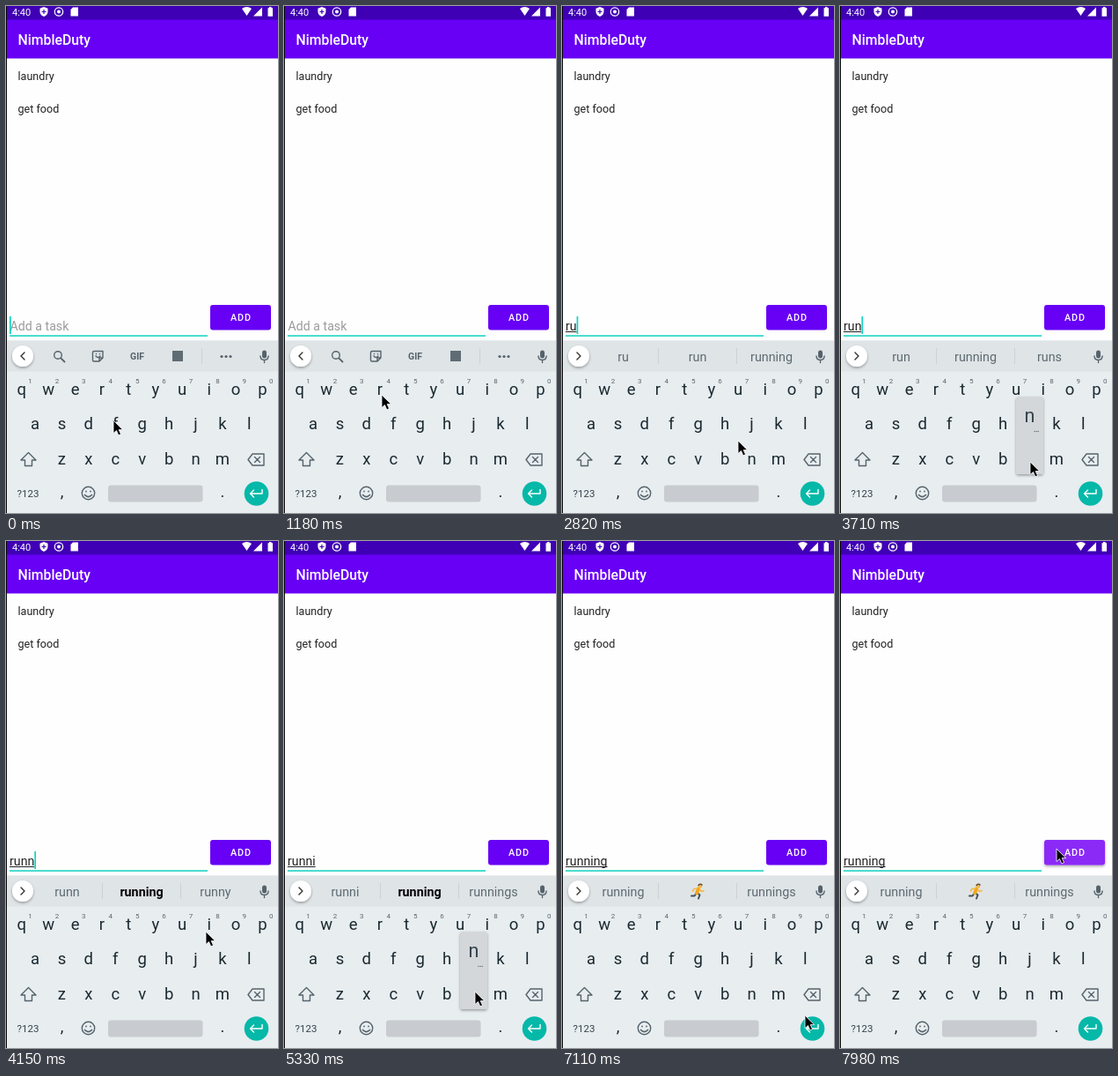
Recreate the animation shown at these times as an HTML page. Size 309 by 575 pixels, loop 8000 ms.

```html
<!DOCTYPE html>
<html lang="en">
<head>
<meta charset="utf-8">
<title>To-do list</title>
<style>
  html, body { margin: 0; width: 100%; height: 100%; overflow: hidden; background: #fefefe; }
  svg { display: block; width: 100%; height: 100%; font-family: Roboto, sans-serif; }
  .mid { text-anchor: middle; }
  .keys { font-size: 18.5px; fill: #1b2a31; }
  .hints { font-size: 8px; fill: #59666d; }
  .words { font-size: 14.3px; fill: #5d6a71; }
  .words .best { font-weight: 700; fill: #000; }
  .line { fill: none; stroke: #55636b; stroke-width: 1.4; stroke-linecap: round; stroke-linejoin: round; }
</style>
</head>
<body>
<svg viewBox="0 0 309 575" preserveAspectRatio="none">
  <defs>
    <filter id="soft" x="-30%" y="-30%" width="160%" height="180%">
      <feDropShadow dx="0" dy="1.5" stdDeviation="1.5" flood-opacity=".35"/>
    </filter>
  </defs>

  <rect width="309" height="575" fill="#fefefe"/>
  <rect y="15" width="309" height="44.5" fill="#6700f5"/>
  <rect width="309" height="15.5" fill="#3f00b5"/>
  <text x="7" y="11" font-size="11" fill="#fff">4:40</text>
  <g fill="#fff">
    <path d="M43 1l4.5 1.8v3.4q0 4-4.5 5.8q-4.5-1.800-4.500-5.800v-3.400z"/>
    <path d="M43 4v5M40.500 6.500h5" stroke="#3f00b5" stroke-width="1.200"/>
    <circle cx="60" cy="6.500" r="4.700" fill="none" stroke="#fff" stroke-width="1.200"/>
    <circle cx="60" cy="6.500" r="2"/>
    <path d="M76 1.500h6v10h-8.500v-7.500z"/>
    <path d="M268 3q5.500-4 11 0l-5.500 8z"/>
    <path d="M291 1.500v10h-10z"/>
    <path d="M297.500 2.200h1.500v-1.200h2.500v1.200h1.500v9.600h-5.500z"/>
  </g>
  <text x="13.500" y="44" font-size="15.8" font-weight="500" fill="#fff">NimbleDuty</text>
  <g font-size="12.6" fill="#222">
    <text x="13.500" y="83.500">laundry</text>
    <text x="13.500" y="121">get food</text>
  </g>

  <text id="hint" x="4.500" y="368" font-size="14.2" fill="#9b9b9b">Add a task</text>
  <text id="typed" x="4" y="368" font-size="14.2" fill="#222"></text>
  <rect id="underline" x="4" y="369" height="1" fill="#222"/>
  <rect x="4" y="373.300" width="225" height="1.500" fill="#10d2c0"/>
  <rect id="caret" y="352" width="1.700" height="20" fill="#10d2c0"/>
  <rect id="button" x="232" y="339" width="69" height="28.500" rx="3" filter="url(#soft)"/>
  <text x="267" y="357.300" class="mid" font-size="10.8" font-weight="500" letter-spacing=".9" fill="#fff">ADD</text>

  <rect y="379.500" width="309" height="196" fill="#e8edf0"/>
  <rect y="379.500" width="309" height="35" fill="#dfe4e7"/>
  <circle cx="19" cy="397" r="12" fill="#fff" filter="url(#soft)"/>
  <path id="chevron" class="line" style="stroke:#333"/>

  <g id="tools">
    <g class="line">
      <circle cx="59" cy="396" r="4.300"/><path d="M62.300 399.300l4.200 4.200" stroke-width="1.800"/>
      <path d="M100 391.500h10v7.500l-4 4h-6q-1.500 0-1.500-1.500v-8.500q0-1.500 1.500-1.500zM106 403v-4h4M102 397q2.500 3 5 0M102.500 394.500v.2M106.500 394.500v.2"/>
    </g>
    <text x="149" y="401" class="mid" font-size="10.500" font-weight="700" fill="#55636b">GIF</text>
    <rect x="189" y="391" width="12" height="12" fill="#5f6c74"/>
    <path d="M222.500 388v18" stroke="#cbd1d5"/>
    <g fill="#55636b"><circle cx="245" cy="397.500" r="1.600"/><circle cx="250" cy="397.500" r="1.600"/><circle cx="255" cy="397.500" r="1.600"/></g>
  </g>

  <g id="words" class="words mid">
    <path d="M109.500 388v18M198.500 388v18" stroke="#cbd1d5"/>
    <text x="69.500" y="403"></text>
    <text x="154" y="403"></text>
    <text x="238" y="403"></text>
    <g id="runner" fill="none" stroke-linecap="round" stroke-linejoin="round">
      <path d="M153.500 399l3 2.500-1.500 4M152.500 399.500l-2 3h-3.500" stroke="#42525c" stroke-width="2"/>
      <path d="M155 394.500l-2 5" stroke="#f2a51d" stroke-width="4"/>
      <path d="M154 394l-4 .5-1.500 2.500M156.500 395l2 2.500 2.500-1" stroke="#f4b942" stroke-width="1.600"/>
      <circle cx="157" cy="391.500" r="2.200" fill="#f4b942"/>
      <path d="M155 390.500q2-2.500 4-.5" stroke="#5a3b28" stroke-width="1.400"/>
    </g>
  </g>
  <rect x="291" y="390.500" width="5" height="9" rx="2.500" fill="#55636b"/>
  <path class="line" d="M289 397q0 4.500 4.500 4.500t4.500-4.500M293.500 402v2.500"/>

  <g id="keys" class="keys mid"></g>
  <g id="hints" class="hints mid"></g>
  <path class="line" d="M25.500 506.500l8.500 8.500h-4.500v6.500h-8v-6.500h-4.500z"/>
  <path class="line" d="M280 508h13v13h-13l-5-6.500zM282.500 511.500l6 6M288.500 511.500l-6 6"/>
  <text x="25" y="557" class="mid" font-size="11.500" fill="#33424a">?123</text>
  <g class="keys mid"><text x="63.500" y="557">,</text><text x="246" y="557">.</text></g>
  <g class="line"><circle cx="93.500" cy="552.500" r="7.200"/><path d="M89.500 554.500q4 4 8 0M91 550.300v.3M96 550.300v.3" stroke-width="1.700"/></g>
  <rect x="116" y="543.500" width="107.500" height="19" rx="3" fill="#c8ccd0"/>
  <circle cx="284.500" cy="553" r="13.800" fill="#05b8a8"/>
  <path class="line" style="stroke:#fff" stroke-width="1.700" d="M291 548.500v4.500h-13M281.500 549l-4 4 4 4"/>

  <g id="popup" class="mid">
    <rect x="-15.500" y="-71" width="31" height="88" rx="3" fill="#d3d7da" filter="url(#soft)"/>
    <text y="-42" font-size="21.500" fill="#33424a"></text>
    <text x="7.500" y="-31" font-size="10" fill="#33424a">…</text>
  </g>
  <rect width="1" height="575" fill="#080808"/>
  <path id="mouse" d="M0 0v14.500l3.500-3 2.300 5.300 2.700-1.200-2.300-5h4.500z" fill="#000" stroke="#fff" stroke-width=".8"/>
</svg>

<script>
const LOOP = 8000;
const $ = id => document.getElementById(id);
const keyAt = {};

function addText(parent, x, y, text) {
  const node = document.createElementNS('http://www.w3.org/2000/svg', 'text');
  node.setAttribute('x', x);
  node.setAttribute('y', y);
  node.textContent = text;
  parent.append(node);
}

[['qwertyuiop', 17.7, 435], ['asdfghjkl', 33, 474], ['zxcvbnm', 63.4, 514]].forEach(([row, left, y]) => {
  [...row].forEach((letter, i) => {
    const x = left + i * 30.42;
    keyAt[letter] = [x, y];
    addText($('keys'), x, y + 6, letter);
    if (row.length === 10) addText($('hints'), x + 9.8, 428, (i + 1) % 10);
  });
});

// [time, x, y]: each position holds until the next one
const moves = [
  [0, 122, 470], [140, 115, 454], [290, 111, 441],
  [1630, 114, 442], [1780, 125, 445], [1930, 155, 446], [2070, 184, 443], [2220, 200, 441],
  [2670, 200, 461], [2820, 200, 493], [2970, 213, 514], [3120, 216, 517],
  [4000, 222, 478], [4150, 227, 443], [4300, 231, 441],
  [4890, 229, 452], [5040, 222, 490], [5190, 217, 511],
  [5630, 203, 500], [5780, 174, 481], [5910, 156, 471],
  [6360, 178, 489], [6510, 230, 528], [6660, 270, 551], [6810, 277, 555],
  [7110, 276, 538], [7260, 271, 482], [7410, 261, 412], [7550, 250, 362], [7700, 247, 351], [7840, 246, 349]
];
// [press time, release time, letter]
const presses = [
  [1480, 1630, 'r'], [2370, 2520, 'u'], [3120, 3260, 'n'], [3710, 3860, 'n'],
  [4450, 4590, 'i'], [5190, 5480, 'n'], [5910, 6210, 'g']
];
const suggestions = {
  r: ['r', 'read', 'really'],
  ru: ['ru', 'run', 'running'],
  run: ['run', 'running', 'runs'],
  runn: ['runn', 'running', 'runny'],
  runni: ['runni', 'running', 'runnings'],
  runnin: ['runnin', 'running', 'runnings'],
  running: ['running', '', 'runnings']
};
const show = (id, on) => $(id).style.display = on ? '' : 'none';

function caretOn(t, lastTyped) {
  if (lastTyped !== undefined) return Math.floor((t - lastTyped) / 500) % 2 === 0;
  return t < 140 || (t >= 590 && t < 1180);
}

function draw(t) {
  const done = presses.filter(p => p[1] <= t);
  const text = done.map(p => p[2]).join('');
  const width = text ? $('typed').textContent === text ? $('typed').getComputedTextLength() : setTyped(text) : setTyped('');

  show('hint', !text);
  $('underline').setAttribute('width', width);
  $('caret').setAttribute('x', 4 + width);
  show('caret', caretOn(t, done.length ? done[done.length - 1][1] : undefined));

  show('tools', !text);
  show('words', text);
  show('runner', text === 'running');
  $('chevron').setAttribute('d', text ? 'M17 393l4 4-4 4' : 'M21 393l-4 4 4 4');
  const labels = $('words').querySelectorAll('text');
  (suggestions[text] || ['', '', '']).forEach((word, i) => labels[i].textContent = word);
  labels[1].classList.toggle('best', text.length > 3);

  const press = presses.find(p => p[0] <= t && t < p[1]);
  show('popup', press);
  if (press) {
    const letter = press[2];
    const [label, more] = $('popup').querySelectorAll('text');
    $('popup').setAttribute('transform', `translate(${keyAt[letter]})`);
    label.textContent = letter;
    more.style.display = letter === 'g' ? 'none' : '';
  }

  const [, x, y] = moves.filter(m => m[0] <= t).pop();
  $('mouse').setAttribute('transform', `translate(${x} ${y})`);
  const pressed = t >= 7840;
  $('button').setAttribute('fill', pressed ? '#8b2af7' : '#6700f5');
  $('button').setAttribute('filter', pressed ? 'url(#soft)' : 'none');
}

function setTyped(text) {
  $('typed').textContent = text;
  return text ? $('typed').getComputedTextLength() : 0;
}

const start = performance.now();
function tick() {
  draw((performance.now() - start) % LOOP);
  requestAnimationFrame(tick);
}
tick();
</script>
</body>
</html>
```
